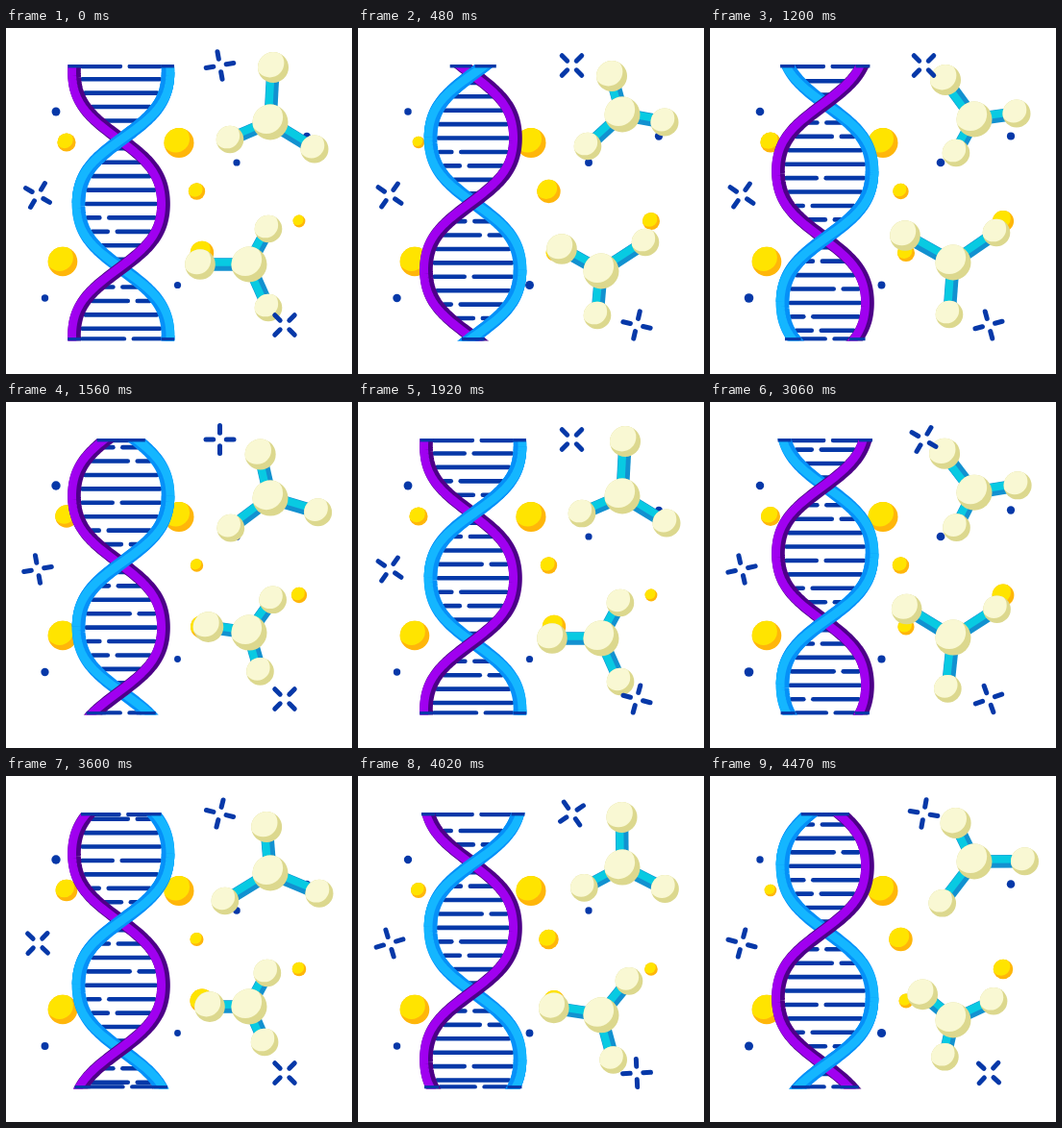
An HTML page with a canvas that plays this animation: 360 px wide and 360 px high, repeating every 4.5 s.

```html
<!DOCTYPE html>
<html lang="en">
<head>
<meta charset="utf-8">
<title>DNA and molecules</title>
<style>
html, body { margin: 0; width: 100%; height: 100%; overflow: hidden; background: #fff; }
canvas { display: block; width: 360px; height: 360px; }
</style>
</head>
<body>
<canvas id="stage" width="360" height="360"></canvas>
<script>
const ctx = document.getElementById('stage').getContext('2d');
const LOOP = 4500, CYCLE = 1922, TAU = Math.PI * 2;
const NAVY = '#0638a8';
const TOP = 38, BOTTOM = 325.5, WAVE = 274, SWING = 46.5, FULLNESS = 1.15, RUNG_STEP = WAVE / 19;

// The lit part is a narrower stripe, shifted sideways or towards the outside.
const BLUE = { mid: 122, side: -1, base: '#0590f8', light: '#14b6ff', shift: 0, spread: 2.4 };
const PURPLE = { mid: 117.5, side: 1, base: '#4d0088', light: '#a000f0', shift: -2.4, spread: 0 };
// Position of the break along each rung; 0 means unbroken.
const RUNG_GAPS = [0, 0.25, 0.35, 0, 0.5, 0, 0.4, 0.7, 0, 0, 0.45, 0, 0.2, 0.65, 0, 0.6, 0.3, 0, 0.7];

const STAR_TIMES = [0, 480, 1200, 1920, 2520, 3600, 4470];
const STARS = [
  { x: 222.5, y: 39, turn: [-10, 45, 135, 225, 318, 464, 550] },
  { x: 33, y: 174, turn: [31, 125, 215, 305, 381, 494, 555] },
  { x: 290, y: 309, turn: [45, 103, 165, 285, 366, 495, 583] }
];

// Radius = r + swell * cos, largest at time peak.
const BALLS = [
  { x: 180, y: 119.5, r: 15.5, swell: 0, peak: 0 },
  { x: 63, y: 119, r: 9, swell: -2.8, peak: 540 },
  { x: 198.5, y: 170, r: 9.5, swell: 2.8, peak: 570 },
  { x: 59, y: 243, r: 15.3, swell: 0, peak: 0 },
  { x: 305, y: 201, r: 9.1, swell: 2.7, peak: 970 },
  { x: 204, y: 234, r: 9.8, swell: -2.8, peak: 800 }
];
const DOTS = [
  { x: 52, y: 87, r: 4.2, swell: 0.5, peak: 1600 },
  { x: 40.5, y: 281, r: 4.3, swell: 0.6, peak: 1000 },
  { x: 178.5, y: 267.5, r: 4, swell: 0.6, peak: 700 },
  { x: 240, y: 140, r: 4, swell: 0.4, peak: 1000 },
  { x: 313, y: 112.5, r: 4, swell: 0.3, peak: 800 }
];

const POSE_TIMES = [0, 480, 595, 790, 1200, 1675];
const MOLECULES = [
  {
    x: 275, y: [98, 90, 89, 90, 95, 101],
    atoms: [
      { r: 16, x: [278, 264, 257, 250, 245, 271], y: [41, 50, 49, 50, 54, 53] },
      { r: 14.5, x: [321, 319, 326, 333, 319, 326], y: [126, 98, 90, 85, 89, 122] },
      { r: 14.3, x: [233, 239, 241, 246, 256, 228], y: [116, 123, 131, 136, 130, 130] }
    ]
  },
  {
    x: 253, y: [246, 253, 254, 253, 244, 240],
    atoms: [
      { r: 14.3, x: [273, 299, 296, 291, 298, 272], y: [209, 223, 233, 236, 213, 205] },
      { r: 14.3, x: [273, 249, 245, 243, 249, 269], y: [291, 299, 293, 291, 298, 277] },
      { r: 15.8, x: [202, 212, 220, 224, 203, 212], y: [246, 230, 228, 224, 216, 240] }
    ]
  }
];

function linear(times, values, t) {
  let i = 0;
  while (i < times.length - 2 && t >= times[i + 1]) i++;
  const u = (t - times[i]) / (times[i + 1] - times[i]);
  return values[i] + (values[i + 1] - values[i]) * u;
}

// Smooth periodic curve through the pose values.
function pose(values, t) {
  const n = values.length;
  const at = i => POSE_TIMES[(i + n) % n] + Math.floor(i / n) * CYCLE;
  const val = i => values[(i + n) % n];
  const slope = i => (val(i + 1) - val(i - 1)) / (at(i + 1) - at(i - 1));
  const p = t % CYCLE;
  let i = n - 1;
  while (POSE_TIMES[i] > p) i--;
  const span = at(i + 1) - at(i), u = (p - at(i)) / span, v = 1 - u;
  return val(i) * (1 + 2 * u) * v * v + slope(i) * span * u * v * v
    + val(i + 1) * u * u * (3 - 2 * u) - slope(i + 1) * span * u * u * v;
}

const pulse = (o, t) => o.r + o.swell * Math.cos(TAU * (t - o.peak) / CYCLE);

function disc(x, y, r, color) {
  ctx.fillStyle = color;
  ctx.beginPath();
  ctx.arc(x, y, r, 0, TAU);
  ctx.fill();
}

function line(x1, y1, x2, y2, width, color, cap = 'round') {
  ctx.strokeStyle = color;
  ctx.lineWidth = width;
  ctx.lineCap = cap;
  ctx.beginPath();
  ctx.moveTo(x1, y1);
  ctx.lineTo(x2, y2);
  ctx.stroke();
}

function sphere(x, y, r, shade, light) {
  ctx.save();
  ctx.beginPath();
  ctx.arc(x, y, r, 0, TAU);
  ctx.clip();
  disc(x, y, r + 1, shade);
  disc(x - r * 0.22, y - r * 0.28, r * 0.93, light);
  ctx.restore();
}

function star({ x, y, turn }, t) {
  ctx.save();
  ctx.translate(x, y);
  ctx.rotate(linear(STAR_TIMES, turn, t) * Math.PI / 180);
  for (let i = 0; i < 4; i++) {
    line(6.8, 0, 14.5, 0, 5, NAVY);
    ctx.rotate(Math.PI / 2);
  }
  ctx.restore();
}

function molecule(m, t) {
  const cx = m.x, cy = pose(m.y, t);
  const atoms = m.atoms.map(a => ({ x: pose(a.x, t), y: pose(a.y, t), r: a.r }));
  for (const a of atoms) {
    const d = Math.hypot(a.x - cx, a.y - cy);
    let nx = (a.y - cy) / d, ny = (cx - a.x) / d;
    if (nx + ny > 0) { nx = -nx; ny = -ny; }
    line(cx, cy, a.x, a.y, 13.5, '#1291d0', 'butt');
    line(cx + nx * 2.2, cy + ny * 2.2, a.x + nx * 2.2, a.y + ny * 2.2, 8, '#08cae2', 'butt');
  }
  for (const a of atoms) sphere(a.x, a.y, a.r, '#dcd88e', '#f9f8d3');
  sphere(cx, cy, 18.5, '#dcd88e', '#f9f8d3');
}

function helix(t) {
  const crest = 183 - WAVE / CYCLE * t;
  // A cosine with broadened crests.
  const wave = y => Math.sin(FULLNESS * Math.cos(TAU * (y - crest) / WAVE)) / Math.sin(FULLNESS);
  const strandX = (s, y, swing = SWING) => s.mid + s.side * swing * wave(y);

  function stripe(s, from, to, width, color, shift, swing) {
    ctx.strokeStyle = color;
    ctx.lineWidth = width;
    ctx.lineCap = 'butt';
    ctx.lineJoin = 'round';
    ctx.beginPath();
    for (let y = from; y <= to; y += 2) ctx.lineTo(strandX(s, y, swing) + shift, y);
    ctx.stroke();
  }

  function ribbon(s, from, to) {
    stripe(s, from, to, 13.6, s.base, 0, SWING);
    stripe(s, from, to, 8.8, s.light, s.shift, SWING + s.spread);
  }

  function rung(y, gap) {
    const a = strandX(BLUE, y), b = strandX(PURPLE, y);
    const left = Math.min(a, b) + 8, right = Math.max(a, b) - 8, width = right - left;
    if (width < 6) return;
    if (!gap || width < 28) return line(left, y, right, y, 4.6, NAVY);
    const mid = left + width * gap;
    line(left, y, mid - 5, y, 4.6, NAVY);
    line(mid + 5, y, right, y, 4.6, NAVY);
  }

  ctx.save();
  ctx.beginPath();
  ctx.rect(50, TOP, 140, BOTTOM - TOP);
  ctx.clip();

  const first = Math.ceil((TOP + 6 - crest) / RUNG_STEP);
  for (let k = first; crest + k * RUNG_STEP < BOTTOM - 6; k++) {
    rung(crest + k * RUNG_STEP, RUNG_GAPS[k % RUNG_GAPS.length]);
  }
  rung(TOP + 2, 0.55);
  rung(BOTTOM - 2, 0.6);

  ribbon(BLUE, TOP - 16, BOTTOM + 16);
  ribbon(PURPLE, TOP - 16, BOTTOM + 16);
  // Blue passes in front on every other half turn.
  const start = crest + WAVE * Math.floor((TOP - crest) / WAVE);
  for (let y = start - WAVE / 2; y < BOTTOM; y += WAVE) ribbon(BLUE, y, y + WAVE / 2);

  for (const y of [TOP, BOTTOM - 3.4]) {
    for (const s of [BLUE, PURPLE]) {
      const half = 6.8 * Math.hypot(1, strandX(s, y + 0.5) - strandX(s, y - 0.5));
      ctx.fillStyle = NAVY;
      ctx.fillRect(strandX(s, y) - half, y, half * 2, 3.4);
    }
  }
  ctx.restore();
}

function draw(t) {
  ctx.fillStyle = '#fff';
  ctx.fillRect(0, 0, 360, 360);
  for (const d of DOTS) disc(d.x, d.y, pulse(d, t), NAVY);
  for (const b of BALLS) sphere(b.x, b.y, pulse(b, t), '#ffb60a', '#ffe400');
  helix(t);
  for (const m of MOLECULES) molecule(m, t);
  for (const s of STARS) star(s, t);
}

function tick() {
  const now = performance.now() % LOOP;
  draw(Math.floor(now / 30) * 30);
  requestAnimationFrame(tick);
}
tick();
</script>
</body>
</html>
```
